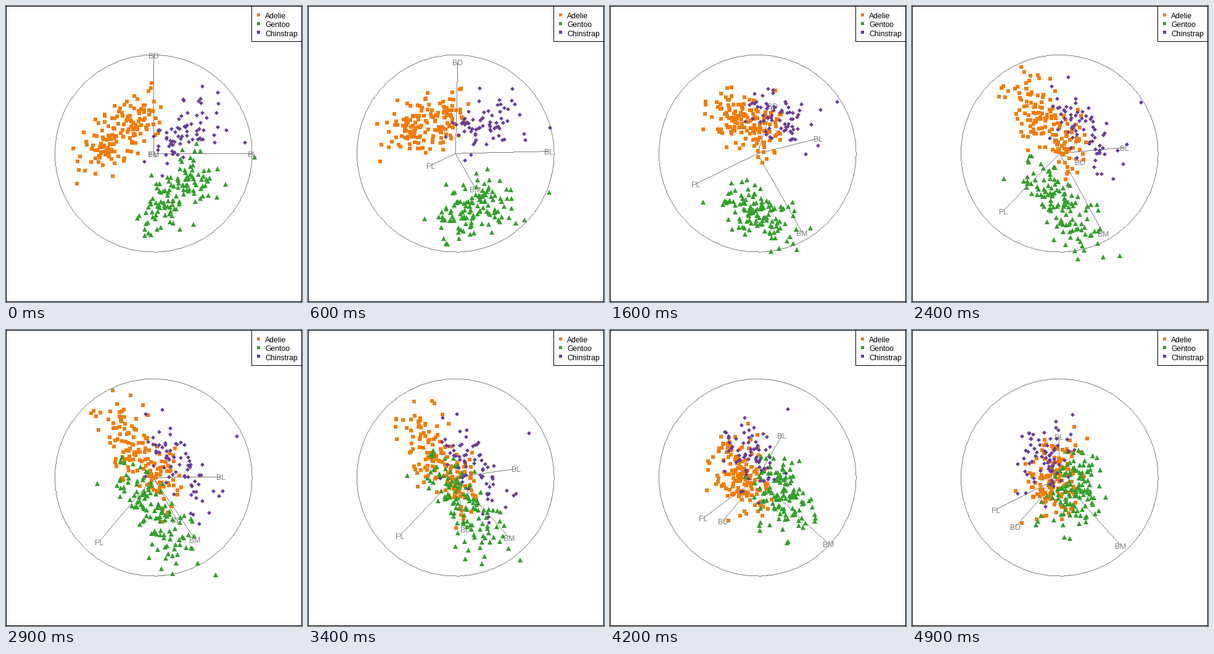
Recreate the animation shown at these times as a matplotlib script. Size 480 by 480 pixels, loop 5000 ms.

```python
import numpy as np
import matplotlib.pyplot as plt
from matplotlib.animation import FuncAnimation
from matplotlib.patches import Rectangle

SIZE, DPI = 480, 100
PX = 72 / DPI                      # points per pixel
FRAMES, INTERVAL = 50, 100
CENTRE = np.array([239.2, 240.2])
RADIUS, SD_PX = 160, 57.15
GREY = "#7f7f7f"

# Bill length, bill depth, flipper length, body mass, all in standard deviations
LABELS = ["BL", "BD", "FL", "BM"]
SEX_SHIFT = np.array([0.35, 0.38, 0.25, 0.42])
SPREAD, SHARED = 0.41, 0.2

# name: count, mean, one far bird, colour, marker, size in pixels
SPECIES = {
    "Adelie": (151, (-0.94, 0.61, -0.78, -0.63), (-2.17, -0.84, -0.92, -1.44),
               "#f57c00", "s", 6),
    "Gentoo": (123, (0.66, -1.1, 1.16, 1.09), (2.87, -0.08, 2.07, 2.3),
               "#33a02c", "^", 7.8),
    "Chinstrap": (68, (0.9, 0.64, -0.36, -0.59), (2.58, 0.33, -1.42, -0.63),
                  "#6a3d9a", "D", 4.8),
}

# Where the tour changes direction: frame, horizontal and vertical weights
TOUR = [
    (0, (1, 0, 0, 0), (0, 1, 0, 0)),
    (16, (.61, .15, -.62, .45), (.15, .49, -.31, -.81)),
    (31, (.71, .26, -.54, .44), (-.03, -.56, -.67, -.59)),
    (45, (.12, -.51, -.54, .77), (.56, -.42, -.35, -.7)),
    (49, (0, -.45, -.65, .62), (.42, -.5, -.33, -.69)),
]
TIMES = [stop[0] for stop in TOUR]
BASES = np.array([np.transpose(stop[1:]) for stop in TOUR])


def make_birds(rng, count, mean, far_bird):
    """Two overlapping clouds, female and male, plus one far bird."""
    noise = (np.sqrt(1 - SHARED) * rng.standard_normal((count - 1, 4))
             + np.sqrt(SHARED) * rng.standard_normal((count - 1, 1)))
    noise = np.clip((noise - noise.mean(0)) / noise.std(0), -2.5, 2.5)
    sex = np.where(np.arange(count - 1) % 2, 1, -1)[:, None]
    return np.vstack([mean + sex * SEX_SHIFT + SPREAD * noise, far_bird])


def basis_at(frame):
    """Orthonormal 4x2 projection on the path between two turns."""
    k = min(np.searchsorted(TIMES, frame, side="right") - 1, len(TIMES) - 2)
    s = (frame - TIMES[k]) / (TIMES[k + 1] - TIMES[k])
    u, _, vt = np.linalg.svd((1 - s) * BASES[k] + s * BASES[k + 1],
                             full_matrices=False)
    return u @ vt


def to_stage(points, scale):
    return CENTRE + scale * points * [1, -1]


def pixel_line(points):
    """Whole pixels along a polyline, for crisp one-pixel strokes."""
    runs = []
    for a, b in zip(points[:-1], points[1:]):
        steps = int(np.ceil(np.abs(b - a).max())) + 1
        runs.append(np.linspace(a, b, steps))
    return (np.floor(np.vstack(runs)) + 0.25).T


def stroke():
    return ax.plot([], [], ls="", marker=",", color=GREY, zorder=1)[0]


def write(x, y, text, color, ha, z):
    return ax.text(x, y, text, color=color, ha=ha, va="baseline",
                   family="Liberation Sans", fontsize=12.2 * PX, zorder=z)


def rect(x, y, w, h, z, face="white", edge="black"):
    ax.add_patch(Rectangle((x, y), w, h, fc=face, ec=edge, zorder=z,
                           lw=PX if edge != "none" else 0, antialiased=False))


fig = plt.figure(figsize=(SIZE / DPI, SIZE / DPI), dpi=DPI, facecolor="white")
ax = fig.add_axes([0, 0, 1, 1])
ax.set(xlim=(0, SIZE), ylim=(SIZE, 0))
ax.axis("off")
rect(0, 0, 479, 479, 0)

theta = np.linspace(0, 2 * np.pi, 50)
ring = to_stage(np.column_stack([np.cos(theta), np.sin(theta)]), RADIUS)
stroke().set_data(*pixel_line(ring))
spokes = [stroke() for _ in LABELS]
tags = [write(0, 0, label, GREY, "center", 2) for label in LABELS]

rect(398, 0, 81, 57, 8)
rng = np.random.default_rng(7)
clouds = []
for i, (name, spec) in enumerate(SPECIES.items()):
    count, mean, far_bird, color, marker, size = spec
    cloud, = ax.plot([], [], ls="", marker=marker, ms=size * PX, mew=0,
                     color=color, antialiased=False, zorder=3 + i)
    clouds.append((cloud, make_birds(rng, count, mean, far_bird)))
    rect(407, 12 + 14 * i, 5, 5, 9, color, "none")
    write(420, 20 + 14.4 * i, name, "black", "left", 9)


def update(frame):
    basis = basis_at(frame)
    for spoke, tag, end in zip(spokes, tags, to_stage(basis, RADIUS)):
        spoke.set_data(*pixel_line(np.array([CENTRE, end])))
        tag.set_position(end + [0, 4.4])
    for cloud, birds in clouds:
        cloud.set_data(*to_stage(birds @ basis, SD_PX).T)
    return [*spokes, *tags, *(cloud for cloud, _ in clouds)]


animation = FuncAnimation(fig, update, frames=FRAMES, interval=INTERVAL,
                          repeat=True, repeat_delay=0)
plt.show()
```
